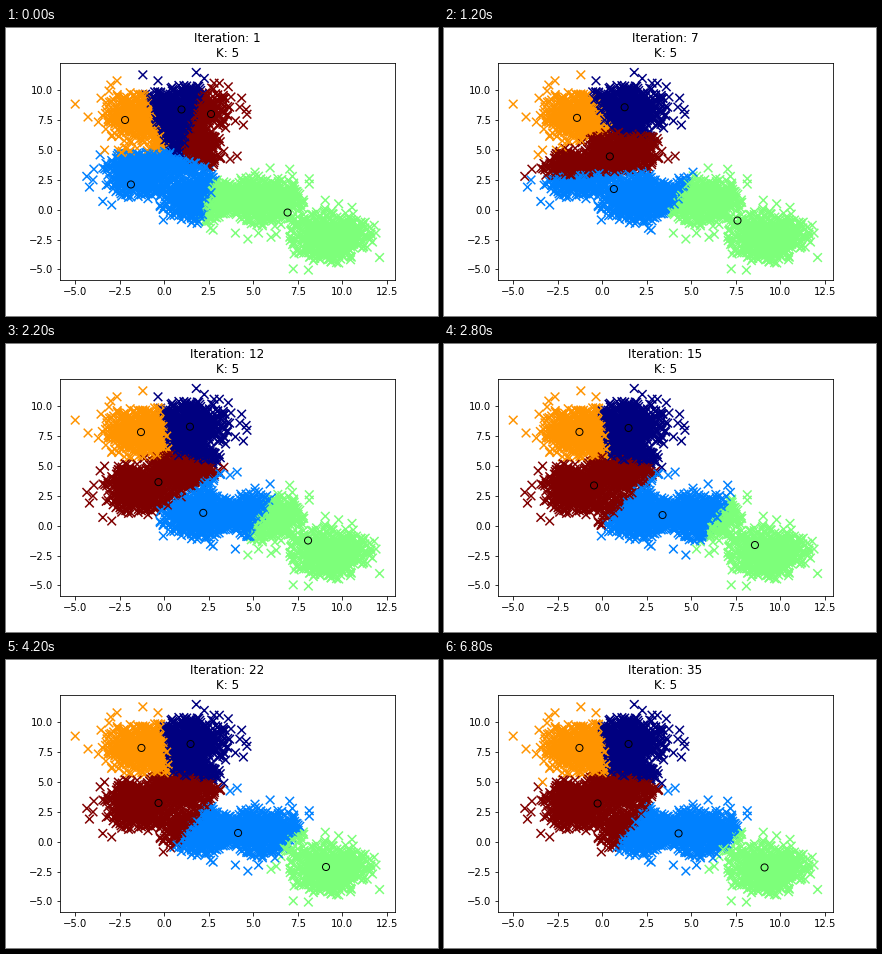
A matplotlib script for the animation above (7 s loop, 432x288 px).

```python
import numpy as np
import matplotlib.pyplot as plt
from matplotlib.animation import FuncAnimation

STEPS = 35
K = 5

plt.rcParams.update({"font.family": "DejaVu Sans", "font.size": 10})

# Gaussian blobs: centre x, centre y, spread, cut-off radius, count
BLOBS = [
    (-1.30, 7.80, 1.00, 2.35, 560),
    (1.50, 8.40, 0.98, 2.25, 560),
    (1.25, 5.00, 0.98, 2.15, 520),
    (-1.30, 3.10, 1.00, 2.30, 560),
    (1.85, 0.95, 1.00, 2.20, 560),
    (3.70, 0.90, 0.75, 1.90, 130),
    (5.70, 0.70, 1.00, 2.25, 560),
    (9.30, -2.20, 1.05, 2.25, 580),
]

# Stray points around the blobs
STRAYS = [
    (-5.0, 8.85), (-4.28, 7.77), (-3.55, 9.35), (-3.1, 9.95), (-2.65, 10.8),
    (-3.0, 10.45), (-1.2, 11.3), (-3.7, 7.35), (-3.6, 4.6), (-3.35, 5.0),
    (1.8, 11.5), (2.25, 11.0), (2.8, 10.6), (3.1, 10.6), (3.6, 10.3),
    (3.75, 9.45), (4.35, 9.35), (4.25, 8.6), (4.6, 8.4), (4.65, 8.0),
    (4.45, 7.1), (4.0, 7.45), (3.45, 6.85), (3.15, 5.7), (3.35, 4.9),
    (3.7, 4.25), (4.1, 4.5), (-0.35, 10.8), (4.3, 2.65), (4.6, 2.65),
    (5.1, 3.15), (-4.35, 2.8), (-3.95, 3.4), (-4.2, 1.9), (-4.0, 2.5),
    (-3.45, 0.7), (-2.95, 0.4), (-0.05, -0.85), (2.6, -1.55), (2.75, -1.7),
    (5.95, 3.5), (7.05, 3.4), (7.2, 2.8), (8.15, 2.6), (8.15, 2.15),
    (4.0, -1.95), (4.7, -2.45), (5.3, -1.95), (6.0, -2.3), (6.3, -2.05),
    (9.05, 0.8), (9.8, 0.5), (10.55, 0.2), (11.8, -1.3), (11.9, -1.95),
    (11.7, -2.7), (12.1, -4.0), (7.25, -4.95), (8.1, -5.05), (7.3, -3.7),
]

# Centroid positions at a few iterations, one row per cluster
KNOTS = np.array([1, 4, 9, 15, 22, 28, 35])
PATHS = np.array([
    [(0.97, 8.40), (1.06, 8.69), (1.37, 8.48), (1.48, 8.19),
     (1.48, 8.19), (1.48, 8.19), (1.48, 8.19)],
    [(-1.87, 2.12), (0.24, 2.20), (0.94, 1.37), (3.39, 0.90),
     (4.15, 0.74), (4.23, 0.70), (4.29, 0.70)],
    [(6.93, -0.23), (7.52, -0.85), (7.66, -0.94), (8.58, -1.61),
     (9.09, -2.11), (9.09, -2.15), (9.12, -2.15)],
    [(-2.20, 7.52), (-1.58, 7.52), (-1.36, 7.81), (-1.28, 7.86),
     (-1.28, 7.86), (-1.28, 7.86), (-1.28, 7.86)],
    [(2.63, 8.02), (1.45, 5.26), (-0.01, 4.13), (-0.46, 3.38),
     (-0.32, 3.25), (-0.28, 3.21), (-0.26, 3.21)],
])


def blob(rng, x, y, spread, cut, count):
    pts = rng.normal(size=(count * 2, 2))
    pts = pts[np.hypot(*pts.T) < cut][:count]
    return pts * spread + (x, y)


def monotone(values, t):
    """Monotone cubic interpolation through the knots."""
    h = np.diff(KNOTS)
    slope = np.diff(values) / h
    a, b = slope[:-1], slope[1:]
    same = a * b > 0
    inner = np.where(same, 2 * a * b / np.where(same, a + b, 1), 0)
    d = np.concatenate([slope[:1], inner, slope[-1:]])
    i = min(np.searchsorted(KNOTS, t, side="right") - 1, len(h) - 1)
    u = (t - KNOTS[i]) / h[i]
    return ((1 + 2 * u) * (1 - u) ** 2 * values[i]
            + u * (1 - u) ** 2 * h[i] * d[i]
            + u * u * (3 - 2 * u) * values[i + 1]
            + u * u * (u - 1) * h[i] * d[i + 1])


def centroids(step):
    return np.array([[monotone(path[:, c], step) for c in (0, 1)]
                     for path in PATHS])


rng = np.random.default_rng(5)
points = np.vstack([blob(rng, *b) for b in BLOBS] + [np.array(STRAYS)])

fig = plt.figure(figsize=(6, 4), dpi=72, facecolor="white")
ax = fig.add_axes([0.125, 0.125, 0.775, 0.755])
ax.set_xlim(-5.855, 12.955)
ax.set_ylim(-5.88, 12.33)
ax.set_xticks(np.arange(-5, 12.6, 2.5))
ax.set_yticks(np.arange(-5, 10.1, 2.5))
title = ax.set_title("", fontsize=12)

cloud = ax.scatter(*points.T, c=np.zeros(len(points)), cmap="jet",
                   vmin=0, vmax=K - 1, marker="x", s=75, linewidths=1.5)
marks = ax.scatter(*centroids(1).T, s=50, marker="o", facecolors="none",
                   edgecolors="black", linewidths=1, zorder=3)


def draw(i):
    step = i + 1
    centres = centroids(step)
    gaps = points[:, None] - centres[None]
    cloud.set_array((gaps ** 2).sum(axis=2).argmin(axis=1))
    marks.set_offsets(centres)
    title.set_text(f"Iteration: {step}\nK: {K}")
    return cloud, marks, title


anim = FuncAnimation(fig, draw, frames=STEPS, interval=200,
                     repeat=True, repeat_delay=0, blit=False)
plt.show()
```
